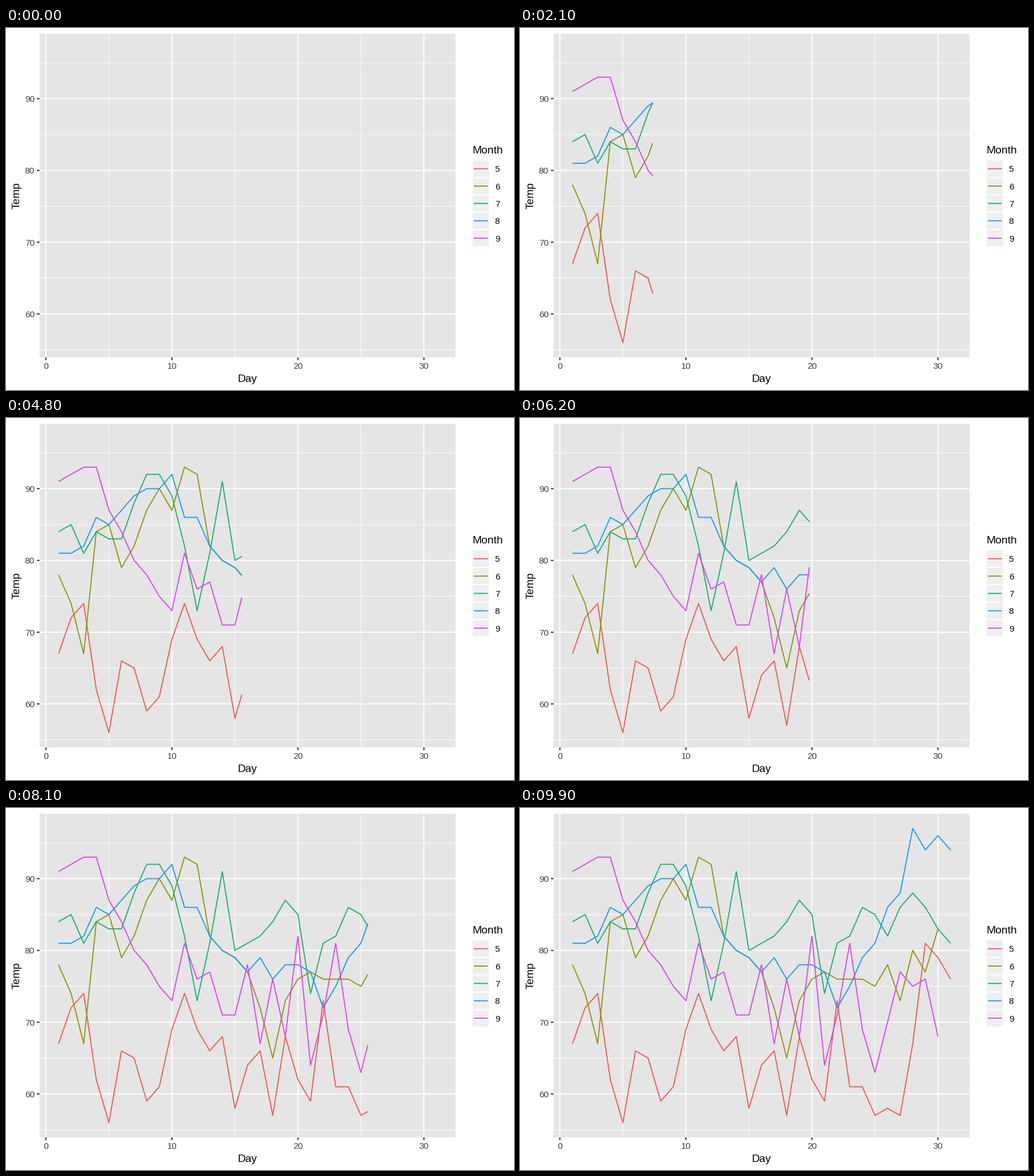
These frames come from a looping animation (885x632 px, 10 s). A matplotlib script:

```python
import matplotlib.pyplot as plt
import numpy as np
from matplotlib.animation import FuncAnimation
from matplotlib.patches import Rectangle

W, H, DPI = 885, 632, 64
PT = 72 / DPI                      # points per pixel
FRAMES, INTERVAL = 100, 100
LEFT, RIGHT, TOP, BOTTOM = 58.5, 783, 10, 575
X_RANGE, Y_RANGE = (-0.5, 32.5), (53.95, 99.05)
LINE, THIN = 1.85, 0.95
BIG, SMALL = 19.1, 15.3

may = [67, 72, 74, 62, 56, 66, 65, 59, 61, 69, 74, 69, 66, 68, 58, 64,
       66, 57, 68, 62, 59, 73, 61, 61, 57, 58, 57, 67, 81, 79, 76]
june = [78, 74, 67, 84, 85, 79, 82, 87, 90, 87, 93, 92, 82, 80, 79,
        77, 72, 65, 73, 76, 77, 76, 76, 76, 75, 78, 73, 80, 77, 83]
july = [84, 85, 81, 84, 83, 83, 88, 92, 92, 89, 82, 73, 81, 91, 80, 81,
        82, 84, 87, 85, 74, 81, 82, 86, 85, 82, 86, 88, 86, 83, 81]
august = [81, 81, 82, 86, 85, 87, 89, 90, 90, 92, 86, 86, 82, 80, 79, 77,
          79, 76, 78, 78, 77, 72, 75, 79, 81, 86, 88, 97, 94, 96, 94]
september = [91, 92, 93, 93, 87, 84, 80, 78, 75, 73, 81, 76, 77, 71, 71,
             78, 67, 76, 68, 82, 64, 71, 81, 69, 63, 70, 77, 75, 76, 68]
months = (may, june, july, august, september)
colors = ("#ef5b52", "#8f950c", "#1bb16c", "#1a9cef", "#db46eb")

plt.rcParams["font.family"] = "Liberation Sans"
fig = plt.figure(figsize=(W / DPI, H / DPI), dpi=DPI, facecolor="white")
ax = fig.add_axes([0, 0, 1, 1])
ax.set(xlim=(0, W), ylim=(H, 0))
ax.axis("off")


def px(day):
    return np.interp(day, X_RANGE, (LEFT, RIGHT))


def py(temp):
    return np.interp(temp, Y_RANGE, (BOTTOM, TOP))


def stroke(xs, ys, color, width=LINE, z=2):
    line, = ax.plot(xs, ys, color=color, lw=width * PT, zorder=z, snap=False,
                    solid_capstyle="butt", solid_joinstyle="round")
    return line


def box(x, y, w, h, color, edge="none"):
    ax.add_patch(Rectangle((x, y), w, h, fc=color, ec=edge,
                           lw=LINE * PT, zorder=1, snap=False))


def label(x, y, text, size, color="black", ha="left", **kw):
    ax.text(x, y, text, size=size * PT, color=color, ha=ha,
            va="baseline", **kw)


def draw_panel():
    box(LEFT, TOP, RIGHT - LEFT, BOTTOM - TOP, "#e5e5e5")
    for day in range(0, 31, 5):
        x, major = px(day), day % 10 == 0
        stroke((x, x), (TOP, BOTTOM), "white", LINE if major else THIN)
        if major:
            stroke((x, x), (BOTTOM, BOTTOM + 4.8), "#272727")
            label(x, 595.3, str(day), SMALL, "#3e3e3e", "center")
    for temp in range(55, 96, 5):
        y, major = py(temp), temp % 10 == 0
        stroke((LEFT, RIGHT), (y, y), "white", LINE if major else THIN)
        if major:
            stroke((LEFT - 4.8, LEFT), (y, y), "#272727")
            label(49.8, y + 5.6, str(temp), SMALL, "#3e3e3e", "right")
    label((LEFT + RIGHT) / 2, 618, "Day", BIG, ha="center")
    ax.text(24, (TOP + BOTTOM) / 2, "Temp", size=BIG * PT, rotation=90,
            rotation_mode="anchor", ha="center", va="baseline")


def draw_legend():
    label(812, 219.4, "Month", BIG)
    for i, color in enumerate(colors):
        y = 245.7 + 30.3 * i
        box(812, y - 15.15, 30.2, 30.3, "#efefef", "white")
        stroke((815, 839.2), (y, y), color)
        label(851.8, y + 5.7, str(5 + i), SMALL)


def update(frame):
    now = 1 + 30 * frame / (FRAMES - 1)
    for line, temps in zip(lines, months):
        end = min(now, len(temps))
        days = np.arange(1, len(temps) + 1)
        shown = np.append(days[days < end], end)
        line.set_data(px(shown), py(np.interp(shown, days, temps)))
    return lines


draw_panel()
draw_legend()
lines = [stroke([], [], color, z=5) for color in colors]

anim = FuncAnimation(fig, update, frames=FRAMES, interval=INTERVAL,
                     repeat=True, repeat_delay=0)
plt.show()
```
